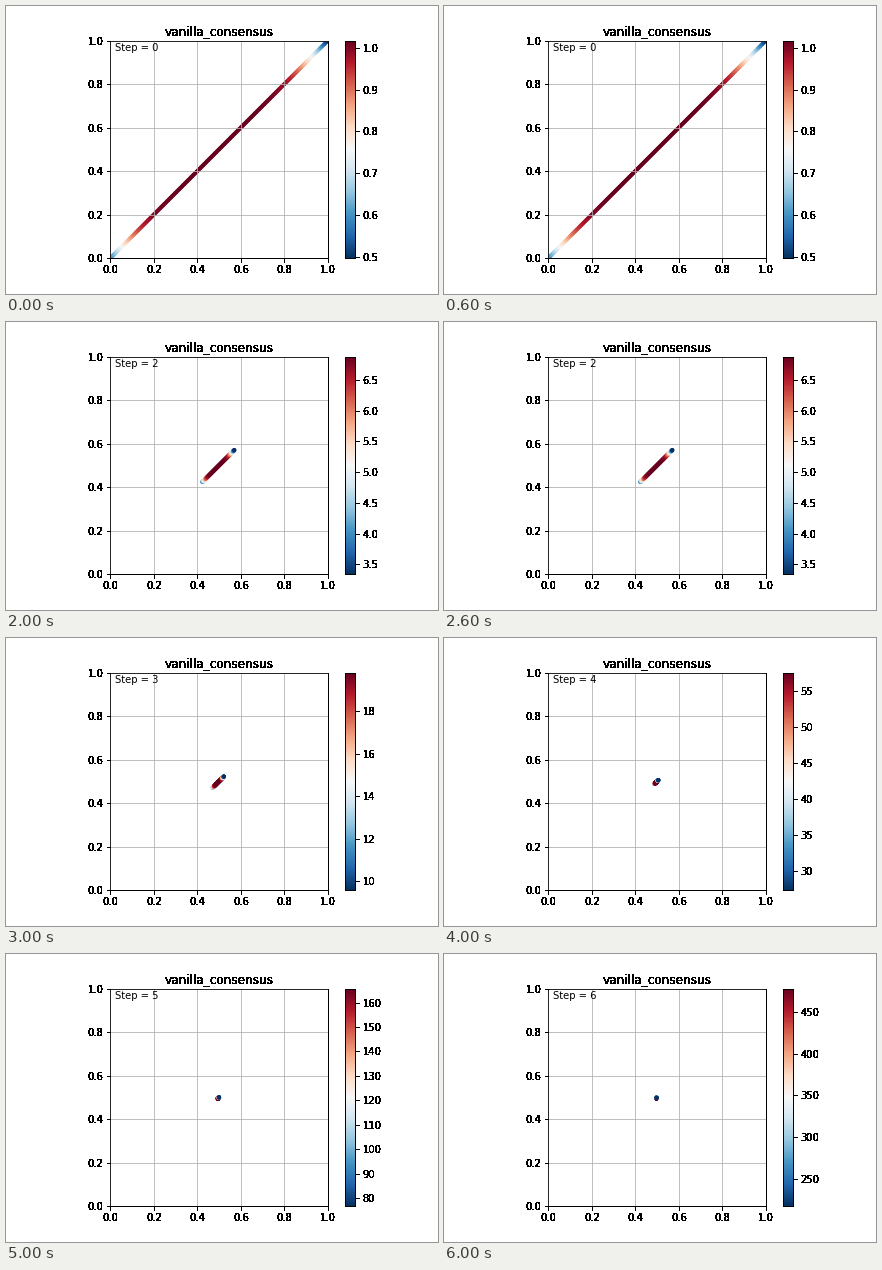
These frames come from a looping animation (432x288 px, 7 s). A matplotlib script:

```python
import math

import matplotlib.pyplot as plt
import numpy as np
from matplotlib.animation import FuncAnimation
from matplotlib.colors import Normalize

plt.rcParams.update({
    "font.family": "DejaVu Sans",
    "font.size": 10,
    "figure.subplot.bottom": 0.125,
    "figure.subplot.top": 0.88,
})

STEPS = 7
AGENTS = 200
CENTER = 0.4965
BANDWIDTH = 0.11
SKEW = 0.02  # the low end is slightly denser than the high end
LOW = [0.4965, 1.163, 3.345, 9.6, 27.3, 76.9, 216.9]
HIGH = [1.018, 2.385, 6.88, 19.83, 57.5, 165.7, 478.8]

rank = np.linspace(0, 1, AGENTS)
edge = np.minimum(rank + SKEW, 1 - rank) / (BANDWIDTH * math.sqrt(2))
shape = np.array([math.erf(e) for e in edge])
shape /= shape.max()


def opinions(step):
    """Agents contract by a constant factor after the first meeting."""
    if step == 0:
        return rank
    return CENTER + 0.4235 * 0.3468 ** (step - 1) * (rank - 0.5)


def harden(image, dpi):
    """Turn soft edges into opaque black, giving heavy, crisp lettering."""
    hard = np.zeros_like(image)
    hard[..., 3] = image[..., 3] > 0.1
    return hard, 0, 0


fig, ax = plt.subplots(figsize=(6, 4), dpi=72)
ax.set_aspect("equal")
ax.set(xlim=(0, 1), ylim=(0, 1))
ticks = np.linspace(0, 1, 6)
ax.set_xticks(ticks)
ax.set_yticks(ticks)
ax.grid(True)

dots = ax.scatter(rank, rank, c=shape, s=10, cmap="RdBu_r")
bar = fig.colorbar(dots, ax=ax)
label = ax.text(0.02, 0.95, "", transform=ax.transAxes)
title = ax.set_title("vanilla_consensus")

crisp = [title, bar.ax.yaxis, bar.outline,
         ax.spines["bottom"], ax.spines["right"]]
for axis in (ax.xaxis, ax.yaxis):
    for tick in axis.get_major_ticks():
        crisp += [tick.label1, tick.tick1line]
for artist in crisp:
    artist.set_agg_filter(harden)


def draw(step):
    x = opinions(step)
    low, high = LOW[step], HIGH[step]
    dots.set_offsets(np.column_stack([x, x]))
    dots.set_array(low + (high - low) * shape)
    # A fresh norm keeps the colorbar from seeing a half-updated range.
    dots.set_norm(Normalize(low, high))
    label.set_text(f"Step = {step}")
    return dots, label


anim = FuncAnimation(fig, draw, frames=STEPS, interval=1000,
                     repeat=True, repeat_delay=0, blit=False)
plt.show()
```
